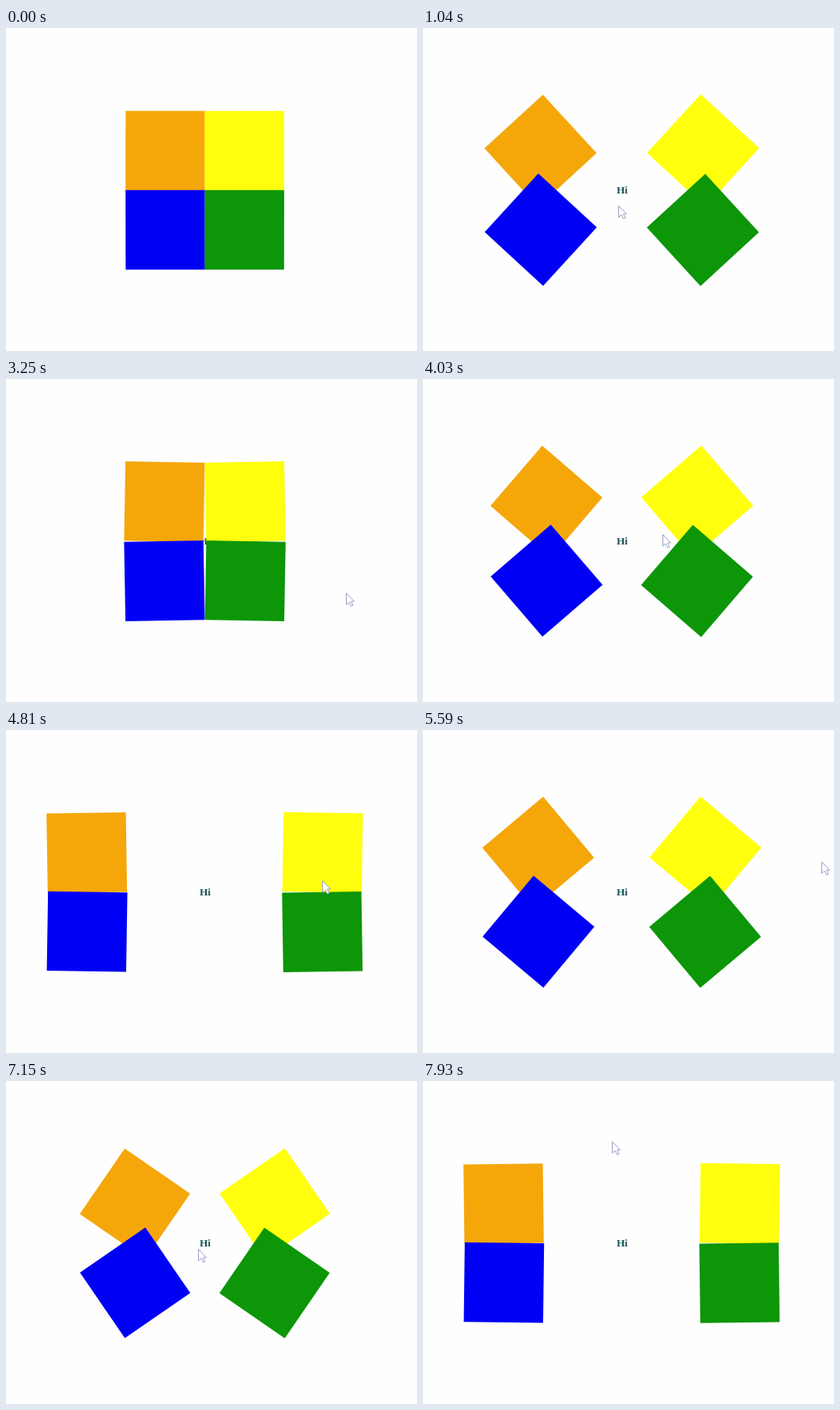
These frames come from a looping animation (520x408 px, 8000 ms). An HTML page with a canvas:

```html
<!DOCTYPE html>
<html lang="en">
<head>
<meta charset="utf-8">
<title>Turning squares</title>
<style>
html, body { margin: 0; width: 100%; height: 100%; overflow: hidden; background: #fefefe; }
canvas { display: block; }
</style>
</head>
<body>
<canvas id="stage" width="520" height="408"></canvas>
<script>
const ctx = document.getElementById("stage").getContext("2d");
const LOOP = 8000, STEP = 130, SIZE = 100;
const CENTER_X = 251.4, CENTER_Y = 204.8;
const colors = ["#f5a70a", "#ffff0d", "#0000f5", "#0c9608"];

// Pointer stops, one every LEG ms, the first below the stage
const LEG = 6 * STEP;
const stops = [
  [300, 420], [250, 220], [210, 274], [327, 359], [430, 270], [303, 196],
  [400, 190], [504, 166], [380, 68], [243, 212], [239, 76]
];
const arrow = new Path2D("M0 0V14.5L3.5 11.5 6 16.5 8.5 15.5 6 10.5H10Z");

// 0 = squares together, 1 = fully apart; the pace slows a little with each swing
function spread(t) {
  let p = 0;
  for (let i = 0; i < 5; i++) {
    const mid = 1024 + 1485 * i + 16 * i * i;
    p += (-1) ** i / (1 + Math.exp((mid - t) * 0.0068));
  }
  return p;
}

function drawSquare(color, i, p) {
  const side = i % 2 ? 1 : -1, row = i < 2 ? -1 : 1;
  ctx.save();
  ctx.translate(CENTER_X + side * SIZE * (0.5 + p), CENTER_Y + row * SIZE / 2);
  ctx.rotate(side * row * p * Math.PI / 2);
  ctx.fillStyle = color;
  ctx.fillRect(-SIZE / 2, -SIZE / 2, SIZE + 0.4, SIZE + 0.4);
  ctx.restore();
}

function drawPointer(t) {
  const leg = Math.max(0, (t - STEP) / LEG);
  const i = Math.min(Math.floor(leg), stops.length - 2);
  const u = leg - i, k = u * u * (3 - 2 * u);
  const [x, y] = stops[i].map((v, axis) => v + (stops[i + 1][axis] - v) * k);
  ctx.save();
  ctx.translate(x + 0.5, y + 0.5);
  ctx.fillStyle = "#fff";
  ctx.fill(arrow);
  ctx.strokeStyle = "#9a9ac8";
  ctx.stroke(arrow);
  ctx.restore();
}

function draw(t) {
  ctx.fillStyle = "#fefefe";
  ctx.fillRect(0, 0, 520, 408);
  ctx.fillStyle = "#1c5458";
  ctx.font = "bold 13.33px 'Liberation Serif', serif";
  ctx.fillText("Hi", 245, 209);
  const p = spread(t);
  colors.forEach((color, i) => drawSquare(color, i, p));
  drawPointer(t);
}

const start = performance.now();
function tick() {
  const t = (performance.now() - start) % LOOP;
  draw(Math.floor(t / STEP) * STEP);
  requestAnimationFrame(tick);
}
tick();
</script>
</body>
</html>
```
